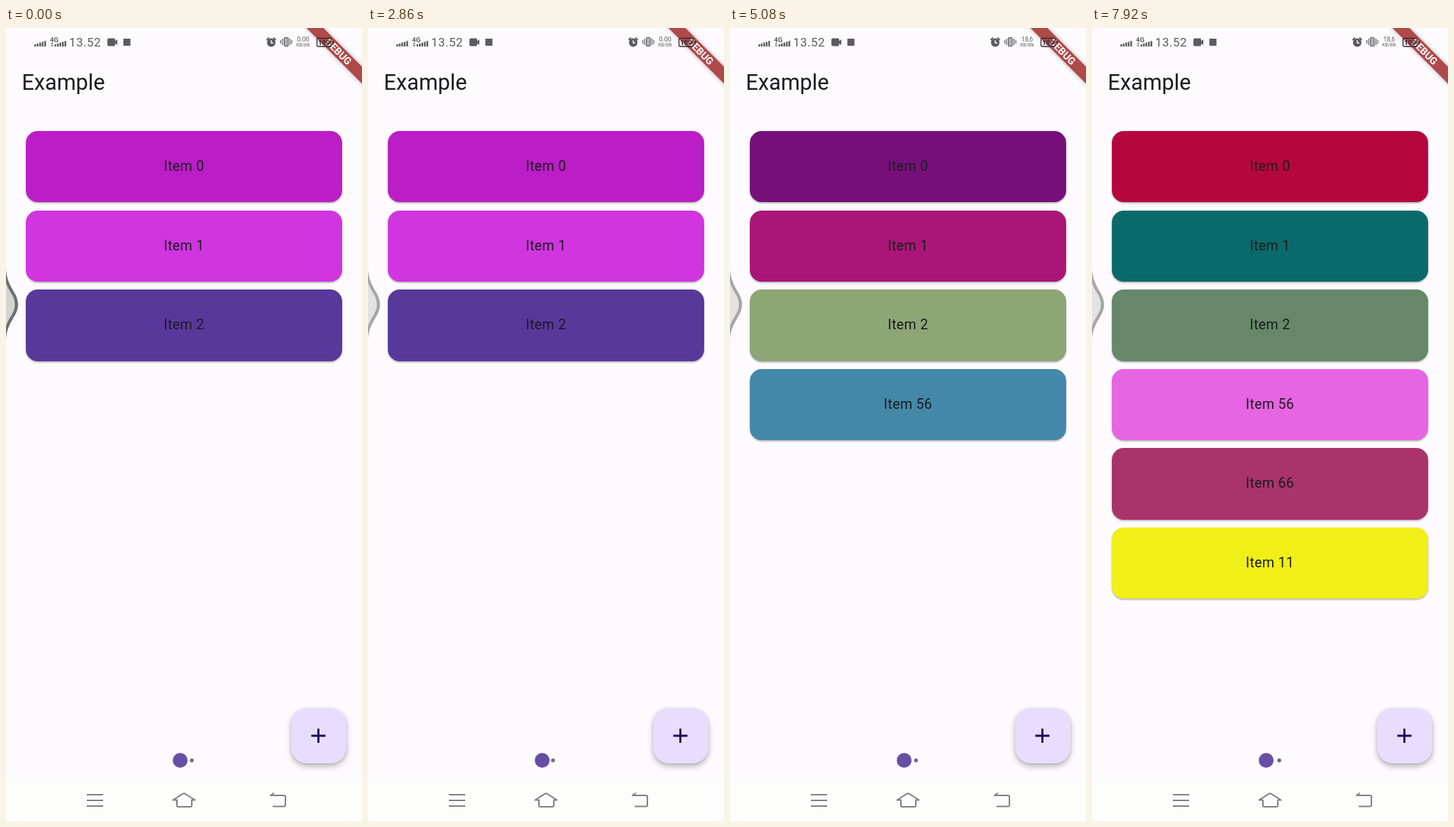
An HTML page that plays this animation: 502 by 1116 pixels, repeating every 8000 ms.

```html
<!DOCTYPE html>
<html lang="en">
<head>
<meta charset="utf-8">
<title>Animated list</title>
<style>
  html, body { margin: 0; width: 100%; height: 100%; overflow: hidden; background: #fefbfe; }
  #stage { position: relative; width: 502px; height: 1116px; overflow: hidden; background: #fefbfe;
    font-family: Roboto, "Noto Sans", sans-serif; color: #1c1b1f; }
  h1 { position: absolute; left: 22.3px; top: 57px; margin: 0; font-size: 30.7px; line-height: 40px; font-weight: 400; }
  #list { position: absolute; left: 0; top: 139.5px; width: 502px; }
  .slot { display: flex; align-items: center; overflow: hidden; }
  .card { flex: none; box-sizing: border-box; width: 446px; height: 100.4px; margin: 0 28px; border-radius: 16.7px;
    box-shadow: 0 1.4px 2.5px rgba(0, 0, 0, .32); text-align: center;
    font-size: 19.5px; line-height: 100.4px; letter-spacing: .35px; }
  #fab { position: absolute; left: 401.5px; top: 957px; width: 78px; height: 78px; border-radius: 22.3px;
    background: #e8ddff; box-shadow: 0 4px 8px rgba(0, 0, 0, .27), 0 1px 3px rgba(0, 0, 0, .12); overflow: hidden; }
  #ink { width: 100%; height: 100%; background: #d0c2ea; }
  #nav { position: absolute; left: 0; top: 1059px; width: 502px; height: 57px; background: #fdfefb; }
  svg { position: absolute; left: 0; top: 0; }
</style>
</head>
<body>
<div id="stage">
  <h1>Example</h1>
  <div id="list"></div>
  <div id="nav"></div>
  <div id="fab"><div id="ink"></div></div>
  <svg width="502" height="1116" viewBox="0 0 502 1116" font-family="Roboto, 'Noto Sans', sans-serif">
    <defs>
      <filter id="soft" x="-20%" y="-60%" width="140%" height="220%"><feGaussianBlur stdDeviation="3"/></filter>
    </defs>

    <!-- corner ribbon -->
    <g transform="translate(468.9 33.3) rotate(45)">
      <rect x="-60" y="-8.4" width="120" height="16.8" fill="#000" opacity=".3" filter="url(#soft)"/>
      <rect x="-60" y="-8.4" width="120" height="16.8" fill="#af494a"/>
      <text y="5" text-anchor="middle" font-size="14.2" font-weight="700" fill="#fff">DEBUG</text>
    </g>

    <!-- status bar -->
    <g fill="#5d5b60">
      <path id="bars1"/>
      <path id="bars2"/>
      <text x="62" y="19.5" font-size="9.5" font-weight="700">4G</text>
      <path d="M63 22.5l2-2 2 2zM63 24l2 2 2-2z"/>
      <text x="89" y="26" font-size="17" letter-spacing=".45">13.52</text>
      <path d="M143 16.5q0-2 2-2h7q2 0 2 2v2l3-2.5v8l-3-2.5v2q0 2-2 2h-7q-2 0-2-2z"/>
      <rect x="165.5" y="15" width="10" height="10"/>
      <circle cx="374" cy="20.5" r="6"/>
      <path d="M367.5 17l3.5-3.5M380.5 17l-3.5-3.5" stroke="#5d5b60" stroke-width="2"/>
      <path d="M374 17v4h3" fill="none" stroke="#fefbfe" stroke-width="1.3"/>
      <path d="M387.5 17v5M390 15v9M400.5 15v9M403 17v5" fill="none" stroke="#5d5b60" stroke-width="1.2"/>
      <rect x="392.5" y="13.5" width="5.5" height="12" rx="1" fill="#b5b2b8" stroke="#5d5b60" stroke-width="1.2"/>
      <text id="rate" x="419" y="19" font-size="8.8" text-anchor="middle"></text>
      <text x="419" y="25.5" font-size="6.3" text-anchor="middle">KB/dtk</text>
    </g>
    <g fill="#35272d">
      <rect x="438.5" y="14.5" width="20" height="11.5" rx="2" fill="none" stroke="#35272d" stroke-width="1.3"/>
      <rect x="460" y="18" width="1.8" height="5"/>
      <text x="448.5" y="23.8" font-size="9.5" font-weight="700" text-anchor="middle">100</text>
    </g>

    <!-- edge handle -->
    <g id="handle">
      <path d="M0 340C2 366 17 372 17 389C17 406 2 412 0 438Z" fill="#6f6f6f"/>
      <path d="M0 358C3 370 12.5 376 12.5 389C12.5 402 3 408 0 420Z" fill="#d4d4d4"/>
    </g>

    <!-- loader -->
    <g fill="#6750a4">
      <circle id="near" cy="1030.7" r="2.7"/>
      <circle id="far" cy="1030.7" r="2.7"/>
      <circle cx="245.6" cy="1030.7" r="10.4"/>
    </g>

    <path d="M440.5 986v20M430.5 996h20" stroke="#21005d" stroke-width="2.9"/>
    <circle id="touch" cx="445" cy="984" r="12.8" fill="#fff" fill-opacity=".83" stroke="#e5c98a" stroke-width="1.3"/>

    <!-- navigation -->
    <g fill="none" stroke="#827e85" stroke-width="2" stroke-linejoin="round">
      <path d="M114 1079h23M114 1087h23M114 1095h23"/>
      <path d="M235.5 1086.5l14-8.8q1.5-1 3 0l14 8.8h-4.5v7.5q0 2-2 2h-17q-2 0-2-2v-7.5z"/>
      <path d="M376 1095.5h16q2 0 2-2v-11.5q0-2-2-2h-19l5-3.5"/>
    </g>
  </svg>
</div>
<script>
const LOOP = 8000, PITCH = 111.6, GROW = 300;
const $ = id => document.getElementById(id);

const labels = [0, 1, 2, 56, 66, 11];
// Each tap recolours every card and grows one more.
const states = [
  { at: 0, colors: ['#bb1dc6', '#d035e0', '#58389b'] },
  { at: 4380, colors: ['#760f7a', '#a91677', '#8ca676', '#4388a8'] },
  { at: 5240, colors: ['#ab3218', '#9a5b12', '#54757e', '#265955', '#5fd818'] },
  { at: 6686, colors: ['#b5073f', '#0a6a6b', '#668868', '#e764e2', '#a9336a', '#f0ef18'] }
];
// Finger down, finger mark gone, button tint gone.
const taps = [[4020, 4380, 4380], [5110, 5380, 5520], [6560, 6850, 7050]];
// Spans in which the picture stands still.
const holds = [[760, 860], [980, 1080], [1640, 1740], [2540, 2640], [4120, 4380],
  [5940, 6040], [6820, 6920], [7700, 7800], [7920, 8000]];
// Loader cycles reached at given times; handle opacity likewise.
const cycles = [[0, .45], [980, 2.23], [2860, 5.55], [4380, 8.14], [5940, 11], [6820, 13.09], [7920, 15.27]];
const fade = [[0, 1], [980, .7], [1700, .6], [LOOP, .6]];

const clamp = v => Math.max(0, Math.min(1, v));

function along(points, t) {
  let i = 1;
  while (i < points.length - 1 && t > points[i][0]) i++;
  const [t0, a] = points[i - 1], [t1, b] = points[i];
  return a + (b - a) * clamp((t - t0) / (t1 - t0));
}

function bars(id, x) {
  let d = '';
  for (let i = 0; i < 5; i++) d += `M${x + i * 3.5} 26v${-(3 + i * 1.2)}h2.4V26z`;
  $(id).setAttribute('d', d);
}
bars('bars1', 40);
bars('bars2', 68.5);

const cards = labels.map(n => {
  const slot = document.createElement('div'), card = document.createElement('div');
  slot.className = 'slot';
  card.className = 'card';
  card.textContent = 'Item ' + n;
  slot.append(card);
  $('list').append(slot);
  return { slot, card };
});

function draw(time) {
  const hold = holds.find(([a, b]) => time > a && time < b);
  const t = hold ? hold[0] : time;

  const state = states.filter(s => t >= s.at).pop();
  cards.forEach(({ slot, card }, i) => {
    const size = i < 3 ? 1 : clamp((t - states[i - 2].at) / GROW);
    slot.style.height = PITCH * size + 'px';
    card.style.background = state.colors[i] || 'none';
  });

  const tap = taps.find(([down, , end]) => t >= down && t < end);
  let tint = 0;
  if (tap) {
    const [down, up, end] = tap;
    tint = t < up ? clamp((t - down) / 100) : (end - t) / (end - up);
  }
  $('ink').style.opacity = tint;
  $('touch').style.opacity = tap && t < tap[1] ? 1 : 0;

  const p = along(cycles, t) % 1;
  $('near').setAttribute('cx', 256 - 11 * p);
  $('near').style.opacity = .75 - .15 * p;
  $('far').setAttribute('cx', 267 - 11 * p);
  $('far').style.opacity = 1 - .2 * p;

  $('handle').style.opacity = along(fade, t);
  $('rate').textContent = t < 3450 ? '0.00' : '18,6';
}

const start = performance.now();
function tick() {
  draw((performance.now() - start) % LOOP);
  requestAnimationFrame(tick);
}
tick();
</script>
</body>
</html>
```
